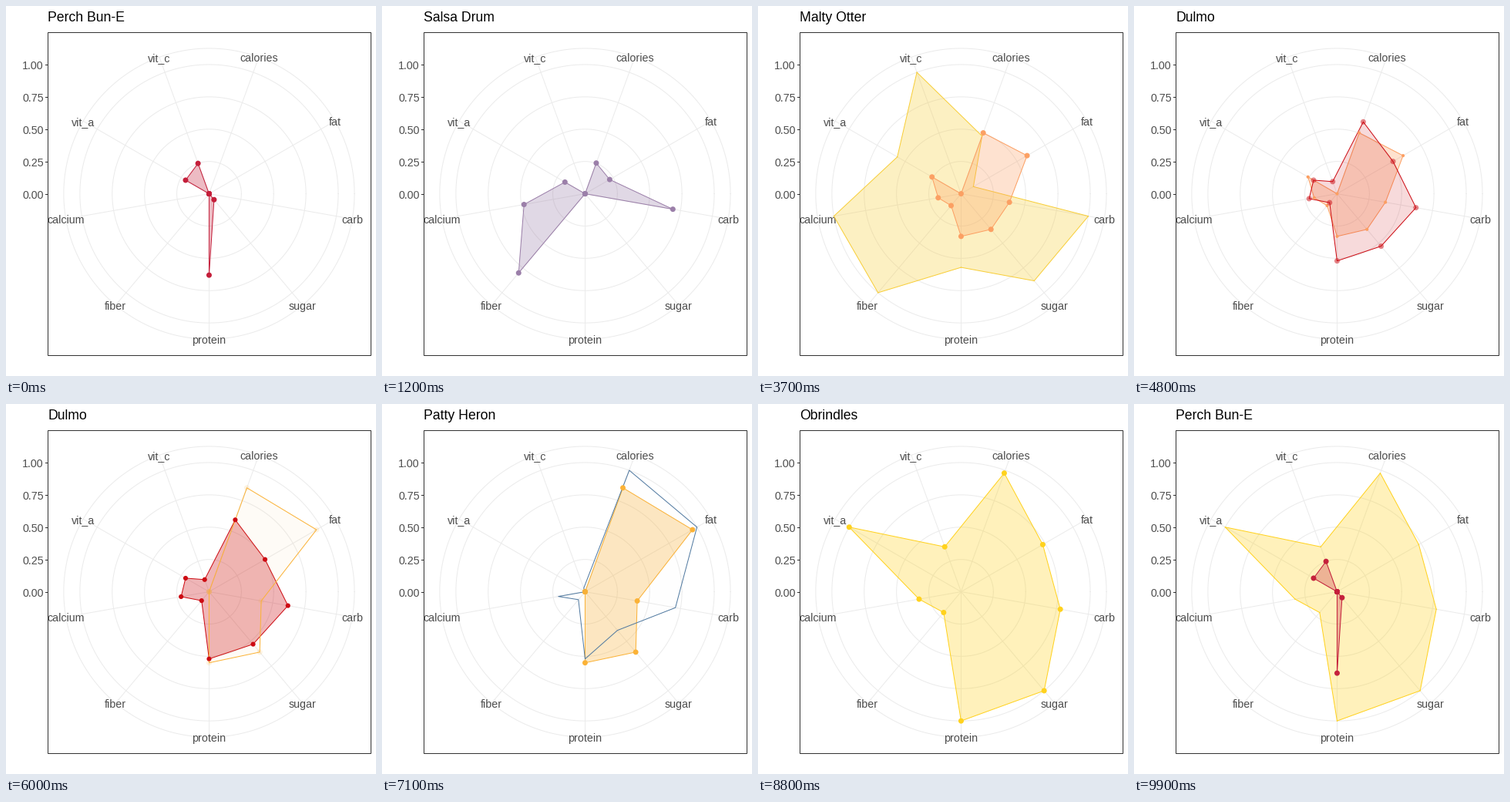
Write a matplotlib script that moves like this. It is 480 px wide and 480 px high and loops after 10000 ms.

```python
import numpy as np
import matplotlib.pyplot as plt
from matplotlib.animation import FuncAnimation
from matplotlib.patches import Circle, Polygon, Rectangle

SIZE, DPI = 480, 100
PX = 72 / DPI                      # one pixel in points
CX, CY, UNIT, RIM = 263.45, 243.55, 167.6, 188.6
FRAMES, INTERVAL, STEPS, HOLD = 100, 100, 6, 7
FILL_ALPHA = 0.3

AXES = ["calories", "fat", "carb", "sugar", "protein",
        "fiber", "calcium", "vit_a", "vit_c"]
ANGLES = np.radians(20 + 40 * np.arange(len(AXES)))

# Scores from 0 to 1; a nutrient left out scores 0, calories are derived.
CHAINS = [
    ("Perch Bun-E", "#C41E3A",
     dict(sugar=.06, protein=.63, vit_a=.21, vit_c=.25)),
    ("Salsa Drum", "#9B7FA9",
     dict(fat=.22, carb=.69, fiber=.8, calcium=.48, vit_a=.18)),
    ("Hoagly", "#F8CE38",
     dict(fat=.11, carb=1, sugar=.88, protein=.57,
          fiber=1, calcium=1, vit_a=.57, vit_c=1)),
    ("Malty Otter", "#FC9F62",
     dict(fat=.59, carb=.38, sugar=.36, protein=.33,
          fiber=.12, calcium=.18, vit_a=.26)),
    ("Dulmo", "#CD0A12",
     dict(fat=.5, carb=.62, sugar=.53, protein=.52,
          fiber=.09, calcium=.22, vit_a=.21, vit_c=.1)),
    ("Patty Heron", "#FBB236",
     dict(fat=.96, carb=.41, sugar=.61, protein=.55)),
    ("Quibo", "#5079A0",
     dict(fat=1, carb=.71, sugar=.39, protein=.52,
          fiber=.08, calcium=.21, vit_c=.03)),
    ("Obrindles", "#FFD21E",
     dict(fat=.73, carb=.78, sugar=1, protein=1,
          fiber=.21, calcium=.33, vit_a=1, vit_c=.37)),
]
# The loop is shared out evenly; each chain holds, then gives way to the next.
STARTS = [part[0] + HOLD for part in np.array_split(np.arange(FRAMES), len(CHAINS))]


def score_table():
    """One row per chain, with calories as a rescaled mix of fat, carb, protein."""
    scores = np.array([[values.get(a, 0) for a in AXES] for *_, values in CHAINS])
    _, fat, carb, _, protein, *_ = scores.T
    energy = 0.72 * fat + 0.4 * carb + 0.3 * protein
    scores[:, 0] = (energy - energy.min()) / np.ptp(energy)
    return scores


SCORES = score_table()

plt.rcParams["font.family"] = "Liberation Sans"
fig = plt.figure(figsize=(SIZE / DPI, SIZE / DPI), dpi=DPI, facecolor="white")
ax = fig.add_axes([0, 0, 1, 1])
ax.set_xlim(0, SIZE)
ax.set_ylim(SIZE, 0)
ax.axis("off")


def polar(radius):
    """Positions on the nine spokes, radius in pixels."""
    return np.column_stack([CX + radius * np.sin(ANGLES),
                            CY - radius * np.cos(ANGLES)])


def label(x, y, text, px=14.2, color="#4D4D4D", ha="center"):
    return ax.text(x, y, text, fontsize=px * PX, color=color,
                   ha=ha, va="baseline", zorder=3)


def draw_grid():
    grid = dict(color="#EBEBEB", lw=PX, zorder=1)
    for (x, y), name in zip(polar(RIM), AXES):
        ax.plot([CX, x], [CY, y], **grid)
        label(x, y + 5.7, name)
    turn = np.linspace(0, 2 * np.pi, 361)
    for radius in [UNIT * q / 4 for q in range(1, 5)] + [RIM]:
        ax.plot(CX + radius * np.cos(turn), CY + radius * np.sin(turn), **grid)
    for q in range(5):
        y = CY - UNIT * q / 4
        ax.plot([50.5, 54], [y, y], color="#333333", lw=PX, zorder=2)
        label(49, y + 6, f"{q / 4:.2f}", ha="right")
    # whole coordinates snap to the middle of a pixel
    ax.add_patch(Rectangle((54, 34), 419, 419, fill=False,
                           ec="#333333", lw=PX, zorder=2))


class Radar:
    """A filled outline with a dot on each spoke."""

    def __init__(self, z):
        self.shape = Polygon(polar(0), closed=True, lw=0, zorder=z)
        self.edge = Polygon(polar(0), closed=True, fill=False, lw=PX,
                            joinstyle="round", zorder=z + 0.1)
        self.dots = [Circle((CX, CY), 1, lw=0, zorder=z + 2) for _ in AXES]
        self.parts = [self.shape, self.edge, *self.dots]
        for part in self.parts:
            ax.add_patch(part)

    def show(self, index, fade=1.0, scale=1.0):
        color = CHAINS[index][1]
        points = polar(UNIT * SCORES[index])
        for outline in (self.shape, self.edge):
            outline.set_xy(points)
        self.shape.set_facecolor(color)
        self.shape.set_alpha(FILL_ALPHA * fade)
        self.edge.set_edgecolor(color)
        for dot, point in zip(self.dots, points):
            dot.center = point
            dot.set_radius(0.6 + 2.9 * scale)
            dot.set_facecolor(color)
            dot.set_alpha(fade)
        self.set_visible(True)

    def set_visible(self, on):
        for part in self.parts:
            part.set_visible(on)


def ease(p):
    return 4 * p ** 3 if p < 0.5 else 1 - 4 * (1 - p) ** 3


draw_grid()
title = label(54.3, 20, "", px=17.6, color="black", ha="left")
leaving, current = Radar(4), Radar(5)


def draw(i):
    started = sum(s <= i for s in STARTS)
    new, old = started % len(CHAINS), started - 1
    step = i - STARTS[old] + 1 if started else STEPS
    p = min(step / STEPS, 1)
    current.show(new, fade=ease(p))
    if p < 1:
        leaving.show(old, scale=1 - ease(p))
    else:
        leaving.set_visible(False)
    title.set_text(CHAINS[new if p >= 0.5 else old][0])
    return [title, *leaving.parts, *current.parts]


anim = FuncAnimation(fig, draw, frames=FRAMES, interval=INTERVAL,
                     init_func=lambda: draw(0), repeat=True, repeat_delay=0)
plt.show()
```
